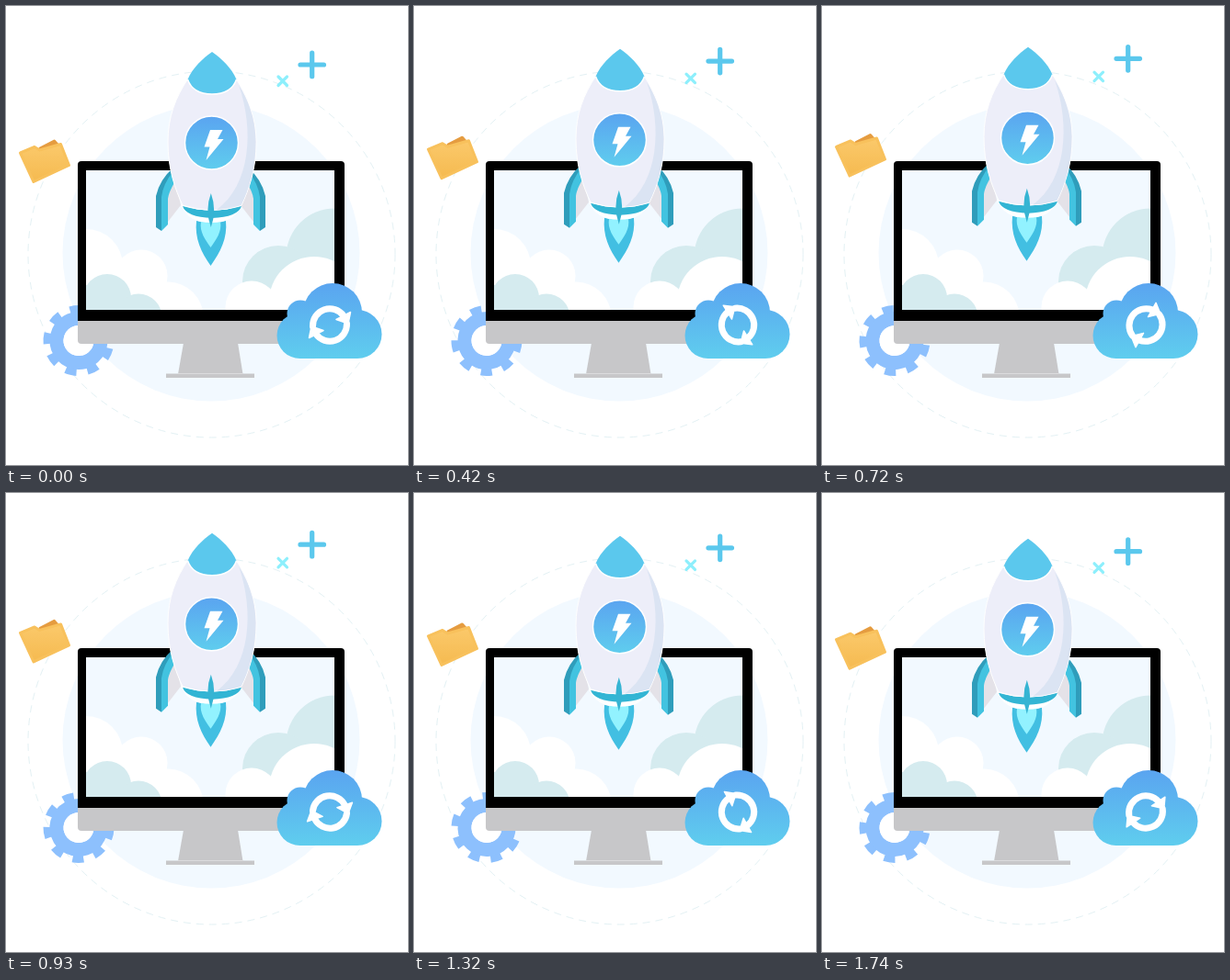
These frames come from a looping animation (437 px wide and 500 px high, 1.77 s). An HTML page:

```html
<!DOCTYPE html>
<html lang="en">
<head>
<meta charset="utf-8">
<title>Rocket launch</title>
<style>
html, body { margin: 0; width: 100%; height: 100%; overflow: hidden; background: #fff; }
svg { display: block; }
</style>
</head>
<body>
<svg width="437" height="500" viewBox="0 0 437 500">
  <defs>
    <linearGradient id="sky" x1="0" y1="0" x2="0" y2="1">
      <stop offset="0" stop-color="#5aa4f0"/><stop offset="1" stop-color="#5fcdee"/>
    </linearGradient>
    <linearGradient id="cloudFill" gradientUnits="userSpaceOnUse" x1="0" y1="302" x2="0" y2="384">
      <stop offset="0" stop-color="#5aa4f0"/><stop offset="1" stop-color="#5fcdee"/>
    </linearGradient>
    <linearGradient id="paper" x1="0" y1="0" x2="0" y2="1">
      <stop offset="0" stop-color="#fbc96b"/><stop offset="1" stop-color="#f5ba50"/>
    </linearGradient>
    <clipPath id="screen"><path d="M87 179H357V331H87Z"/></clipPath>
    <g id="fin">
      <path d="M182 176Q167 189 163 207V241L169 245L171 212L183 190Z" fill="#2f9dbb"/>
      <path d="M182 180Q171 193 169 208V245L176 238V211L188 198Z" fill="#42c3e0"/>
      <path d="M184 191Q177 202 176 210V235L190 217Z" fill="#e4e2e8"/>
    </g>
    <g id="arrow">
      <path d="M-18.5 1.5A18.5 18.5 0 0 1 15 -10" fill="none" stroke="#fff" stroke-width="7" stroke-linecap="round"/>
      <path d="M22.5 -14L20 -1.500L7 -6Z" fill="#fff" stroke="#fff" stroke-width="1.500" stroke-linejoin="round"/>
    </g>
  </defs>

  <circle cx="223.500" cy="270.500" r="199.500" fill="none" stroke="#e3f1f4" stroke-dasharray="8 6"/>
  <circle cx="223" cy="269" r="161.500" fill="#f2f9ff"/>

  <g id="gear" fill="none" stroke="#8dc0fd">
    <circle r="24" stroke-width="15"/>
    <circle r="34.500" stroke-width="8" pathLength="18" stroke-dasharray="1 1"/>
    <circle r="16.500" fill="#fff" stroke="none"/>
  </g>

  <!-- monitor -->
  <path d="M193 367H252L257.500 401H187Z" fill="#c7c7c9"/>
  <path d="M174 400.500H270V405H174Z" fill="#c7c7c9"/>
  <path d="M187 400.500H257.500" stroke="#dcdcde"/>
  <path d="M78 342H368V364Q368 368 364 368H82Q78 368 78 364Z" fill="#c7c7c9"/>
  <path d="M78 343V173Q78 169 82 169H364Q368 169 368 173V343Z"/>
  <path d="M87 179H357V331H87Z" fill="#f2f9ff"/>
  <g clip-path="url(#screen)">
    <g fill="#d5ebef">
      <circle cx="357" cy="273" r="52.500"/><circle cx="296" cy="300" r="39"/>
      <path d="M262 300H357V331H262Z"/>
    </g>
    <g fill="#fff">
      <circle cx="87" cy="283" r="40"/><circle cx="147" cy="294" r="28.500"/>
      <circle cx="176" cy="339" r="38.500"/><path d="M87 283H150V331H87Z"/>
      <circle cx="335" cy="322" r="49"/><circle cx="267" cy="328" r="28.500"/>
    </g>
    <g fill="#d5ebef">
      <circle cx="110" cy="318" r="26"/><circle cx="144" cy="339" r="25.500"/>
      <path d="M87 304H120V331H87Z"/>
    </g>
  </g>

  <g id="rocket">
    <use href="#fin"/>
    <use href="#fin" transform="matrix(-1 0 0 1 445 0)"/>
    <path d="M207 234Q223 239 239 234C241 253 233 268 222.500 283C212 268 205 253 207 234Z" fill="#42bfe2"/>
    <path d="M212 235H233C235 246 228 255 222.500 263C217 255 210 246 212 235Z" fill="#92f2ff"/>
    <path d="M190 216L256 216Q250 236 223 236Q197 236 190 216Z" fill="#fff"/>
    <path d="M192 218Q224 227 256 218Q252 230 224 231Q196 230 192 218Z" fill="#33b5d4"/>
    <path d="M198 79C184 100 176 121 176 148C176 178 184 200 192 217Q224 228 256 217C264 200 272 178 272 148C272 121 262 98 250 79Z" fill="#edeef9" stroke="#fff"/>
    <path d="M253 86C270 135 266 195 229 222Q243 221 255.500 217C264 200 271.500 178 271.500 148C271.500 123 263 102 253 86Z" fill="#dbe4f3"/>
    <path d="M197.500 80C203 67 214 57 224 50C234 57 245 67 250.500 80Q245 96 224 96Q203 96 197.500 80Z" fill="#5bc8ed"/>
    <path d="M197.500 80Q203 96 224 96Q245 96 250.500 80" fill="none" stroke="#fff" stroke-width="1.500"/>
    <circle cx="223.500" cy="149" r="29" fill="url(#sky)" stroke="#fff" stroke-width="1.500"/>
    <path d="M222 135H235.500L230 145H236.500L217.500 168L221.500 153.500H215.500Z" fill="#fff"/>
    <path d="M222.800 204Q229.500 222 222.800 241Q216 222 222.800 204Z" fill="#36b4d3"/>
  </g>

  <g id="folder" stroke-linejoin="round" stroke-width="3">
    <path d="M37 155L52.500 147L56 151L42 160Z" fill="#e59c40" stroke="#e59c40"/>
    <path d="M15.500 160L31 153.500L36.500 157L59.500 150.500L68.500 173.500L30 191.500Z" fill="url(#paper)" stroke="#f8c15c"/>
  </g>
  <path id="plus" d="M320 64H345.500M332.700 51.200V76.700" stroke="#5bc8ed" stroke-width="5.200" stroke-linecap="round"/>
  <path id="cross" d="M296 77L305.500 86.500M305.500 77L296 86.500" stroke="#8deffc" stroke-width="3.200" stroke-linecap="round"/>

  <g fill="url(#cloudFill)">
    <circle cx="355" cy="334" r="32"/><circle cx="382" cy="357.500" r="26.500"/>
    <circle cx="319.500" cy="359" r="25"/><circle cx="320" cy="335" r="14.500"/>
    <path d="M319 335H382V384H319Z"/>
  </g>
  <g id="sync"><use href="#arrow"/><use href="#arrow" transform="rotate(180)"/></g>
</svg>
<script>
const LOOP = 1770, STEP = 30;
const lifts = { rocket: 6.6, folder: 8, plus: 8.2, cross: 6 };
const place = (id, transform) => document.getElementById(id).setAttribute("transform", transform);

function draw(now) {
  const time = Math.floor(now % LOOP / STEP) * STEP;
  const turn = time / LOOP;
  const rise = 1 - Math.abs(1 - 2 * turn);
  for (const id in lifts) place(id, `translate(0 ${-lifts[id] * rise})`);
  place("gear", `translate(79 364.5) rotate(${14 + 280 * turn})`);
  place("sync", `translate(352 347.5) rotate(${360 * turn})`);
}

const start = performance.now();
function tick() {
  draw(performance.now() - start);
  requestAnimationFrame(tick);
}
tick();
</script>
</body>
</html>
```
